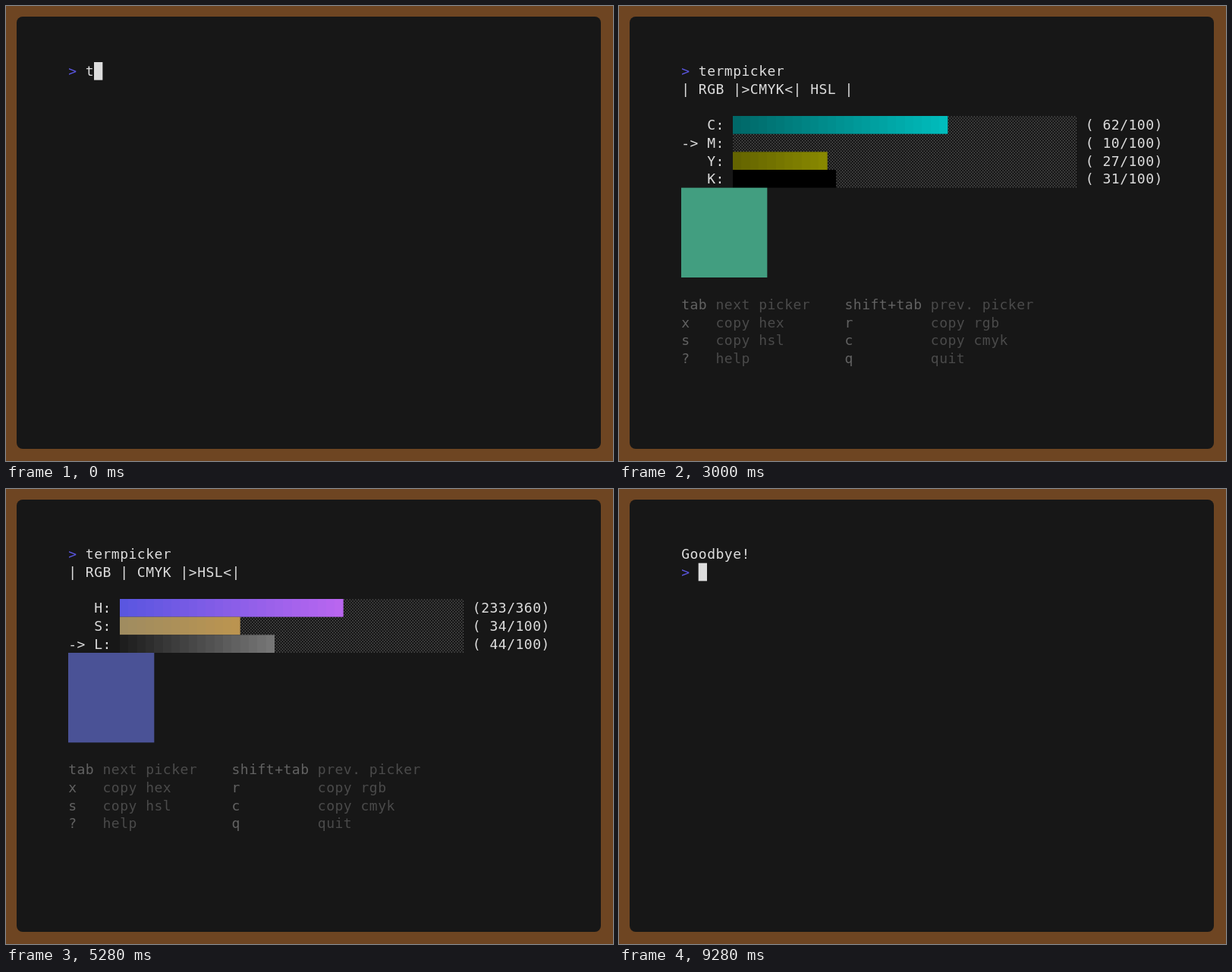
These frames come from a looping animation (800x600 px, 9.56 s). An HTML page with a canvas:

```html
<!DOCTYPE html>
<html lang="en">
<head>
<meta charset="utf-8">
<title>termpicker</title>
<style>
  html, body { margin: 0; width: 100%; height: 100%; overflow: hidden; background: #6e4522; }
  canvas { display: block; }
</style>
</head>
<body>
<canvas id="stage" width="800" height="600"></canvas>
<script>
const ctx = document.getElementById('stage').getContext('2d');
const LOOP = 9560, TICK = 40, KEY_GAP = 50;
const LEFT = 82, TOP = 74, CELL_W = 34 / 3, CELL_H = 71 / 3, BAR = 40;
const FG = '#dddddd', KEY = '#626262', DESC = '#4a4a4a', PROMPT = '#5a56e0';
const START = 640, ENTER = 540, HELP = 6400, QUIT = 9280;

// Colour conversions; every picker works with whole numbers.
const toCmyk = rgb => {
  const max = Math.max(...rgb);
  return [...rgb.map(v => Math.round(100 * (1 - v / max))), Math.round(100 * (1 - max / 255))];
};
const fromCmyk = ([c, m, y, k]) =>
  [c, m, y].map(v => Math.floor(255 * (1 - v / 100) * (1 - k / 100)));
const toHsl = ([r, g, b]) => {
  const max = Math.max(r, g, b), min = Math.min(r, g, b), d = max - min, sum = max + min;
  const sector = max === r ? ((g - b) / d + 6) % 6 : max === g ? 2 + (b - r) / d : 4 + (r - g) / d;
  const sat = d / (sum > 255 ? 510 - sum : sum);
  return [sector * 60, sat * 100, sum / 5.1].map(Math.floor);
};
const fromHsl = ([h, s, l]) => [0, 8, 4].map(n => {
  const k = (n + h / 30) % 12, a = s / 100 * Math.min(l, 100 - l) / 100;
  return Math.floor(255 * (l / 100 - a * Math.max(-1, Math.min(k - 3, 9 - k, 1))));
});
const same = v => [...v];

const PICKERS = [
  { name: 'RGB', max: [255, 255, 255], rest: 0, from: same, to: same, ramps: [
    [[96, 0, 0], [240, 0, 0]], [[0, 96, 0], [0, 240, 0]], [[0, 0, 96], [0, 0, 240]]] },
  { name: 'CMYK', max: [100, 100, 100, 100], rest: .5, from: toCmyk, to: fromCmyk, ramps: [
    [[0, 104, 104], [0, 240, 240]], [[104, 0, 104], [240, 0, 240]],
    [[100, 100, 0], [240, 240, 0]], [[0, 0, 0], [0, 0, 0]]] },
  { name: 'HSL', max: [360, 100, 100], rest: .5, from: toHsl, to: fromHsl, ramps: [
    [[90, 86, 224], [238, 111, 248]], [[160, 140, 96], [240, 165, 48]],
    [[30, 30, 30], [230, 230, 230]]] },
];

// Keystrokes: j moves to the next slider, h and l change it, T is the tab key.
const EVENTS = [
  [1035, 'jjjhhhhh'], [2400, 'T'],
  [2900, 'jlllllhhhhhjllllhhjlllhh'], [4090, 'T'],
  [4562, 'jjjlllllj hhjlhhh'], [6920, 'T'],
  [7420, 'jjjllllljlllllljhh'],
].flatMap(([at, keys]) => [...keys].map((key, i) => ({ at: at + i * KEY_GAP, key })));

// Critically damped spring answering a unit step.
const spring = ms => {
  const x = 18 * ms / 1000;
  return 1 - (1 + x) * Math.exp(-x);
};

function stateAt(t) {
  const sliders = PICKERS.map(p => p.max.map(max => (
    { max, value: 0, target: p.rest, shown: p.rest })));
  const focus = [0, 0, 0];
  let active = 0;
  const set = (slider, value, at) => {
    slider.value = Math.max(0, Math.min(slider.max, value));
    const target = slider.value / slider.max;
    slider.shown += (target - slider.target) * spring(t - at);
    slider.target = target;
  };
  const load = (rgb, at) =>
    PICKERS[active].from(rgb).forEach((v, i) => set(sliders[active][i], v, at));
  const color = () => PICKERS[active].to(sliders[active].map(s => s.value));

  load([127, 175, 127], START);
  for (const { at, key } of EVENTS) {
    if (at > t) break;
    const row = sliders[active], slider = row[focus[active]];
    if (key === 'T') {
      const rgb = color();
      active = (active + 1) % PICKERS.length;
      load(rgb, at);
    } else if (key === 'j') {
      focus[active] = (focus[active] + 1) % row.length;
    } else if (key !== ' ') {
      const step = Math.floor(slider.max * .05);
      set(slider, slider.value + (key === 'l' ? step : -step), at);
    }
  }
  return { active, focus: focus[active], row: sliders[active], color: color() };
}

const px = col => LEFT + col * CELL_W;
const py = row => TOP + row * CELL_H;
const css = rgb => `rgb(${rgb.map(Math.round)})`;

function text(str, col, row, color = FG) {
  ctx.fillStyle = color;
  [...str].forEach((ch, i) => ctx.fillText(ch, px(col + i) + .2, py(row) + 18.3));
}

function block(col, row, w, h, fill) {
  ctx.fillStyle = fill;
  ctx.fillRect(px(col), py(row), w * CELL_W, h * CELL_H);
}

// One flat colour per cell, running along the whole bar.
function ramp(col, [from, to]) {
  const fill = ctx.createLinearGradient(px(col), 0, px(col + BAR), 0);
  for (let c = 0; c < BAR; c++) {
    const color = css(from.map((v, k) => v + (to[k] - v) * c / (BAR - 1)));
    fill.addColorStop(c / BAR, color);
    fill.addColorStop((c + 1) / BAR, color);
  }
  return fill;
}

function shade(col, row, cells) {
  ctx.fillStyle = '#606060';
  const dx = CELL_W / 3, dy = CELL_H / 12;
  for (let j = 0; j < 12; j++)
    for (let i = 0; i < cells * 3; i++)
      ctx.fillRect(px(col) + (i + (j % 2 ? .6 : .1)) * dx, py(row) + (j + .2) * dy, 1.3, 1.3);
}

function helpColumn(entries, keyCol, descCol, row) {
  entries.forEach(([key, desc], i) => {
    text(key, keyCol, row + i, KEY);
    text(desc, descCol, row + i, DESC);
  });
}

const [next, prev, hex, rgb, hsl, cmyk, help, quit] = [
  ['tab', 'next picker'], ['shift+tab', 'prev. picker'], ['x', 'copy hex'], ['r', 'copy rgb'],
  ['s', 'copy hsl'], ['c', 'copy cmyk'], ['?', 'help'], ['q', 'quit']];

function drawHelp(full, row) {
  if (full) {
    helpColumn([next, prev, hex, rgb, hsl, cmyk, help, quit], 0, 10, row);
    helpColumn([['j', 'prev. slider'], ['k', 'next slider']], 26, 28, row);
    helpColumn([['l', 'inc. (coarse)'], ['h', 'dec. (coarse)'],
                ['L', 'inc. (fine)'], ['H', 'dec. (fine)']], 40, 42, row);
  } else {
    helpColumn([next, hex, hsl, help], 0, 4, row);
    helpColumn([prev, rgb, cmyk, quit], 19, 29, row);
  }
}

function drawApp(t, top) {
  const { active, focus, row, color } = stateAt(t);
  const { name, ramps } = PICKERS[active];
  const tabs = PICKERS.map((p, i) => i === active ? `>${p.name}<` : ` ${p.name} `);
  text(`|${tabs.join('|')}|`, 0, top);
  row.forEach((slider, i) => {
    const y = top + 2 + i, filled = Math.max(0, Math.min(BAR, Math.round(slider.shown * BAR)));
    text(`${i === focus ? '->' : '  '} ${name[i]}:`, 0, y);
    block(6, y, filled, 1, ramp(6, ramps[i]));
    shade(6 + filled, y, BAR - filled);
    text(`(${String(slider.value).padStart(3)}/${slider.max})`, 47, y);
  });
  const below = top + 2 + row.length;
  block(0, below, 10, 5, css(color));
  drawHelp(t >= HELP, below + 6);
}

function prompt(row, command) {
  text('>', 0, row, PROMPT);
  text(command, 2, row);
}

function draw(t) {
  ctx.fillStyle = '#6e4522';
  ctx.fillRect(0, 0, 800, 600);
  ctx.fillStyle = '#171717';
  ctx.beginPath();
  ctx.roundRect(14, 14, 770, 570, 8);
  ctx.fill();
  ctx.font = '18px "DejaVu Sans Mono", monospace';

  if (t >= QUIT) {
    text('Goodbye!', 0, 0);
    prompt(1, '');
    block(2, 1, 1, 1, FG);
    return;
  }
  if (t < HELP) {
    const typed = 'termpicker'.slice(0, 1 + Math.floor(t / KEY_GAP));
    prompt(0, typed);
    if (t < ENTER) block(2 + typed.length, 0, 1, 1, FG);
    else if (t < START) block(0, 1, 1, 1, FG);
  }
  if (t >= START) drawApp(t, t < HELP ? 1 : 0);
}

const begin = performance.now();
let last = -1;
function loop() {
  const t = Math.floor((performance.now() - begin) % LOOP / TICK) * TICK;
  if (t !== last) draw(last = t);
  requestAnimationFrame(loop);
}
loop();
</script>
</body>
</html>
```
